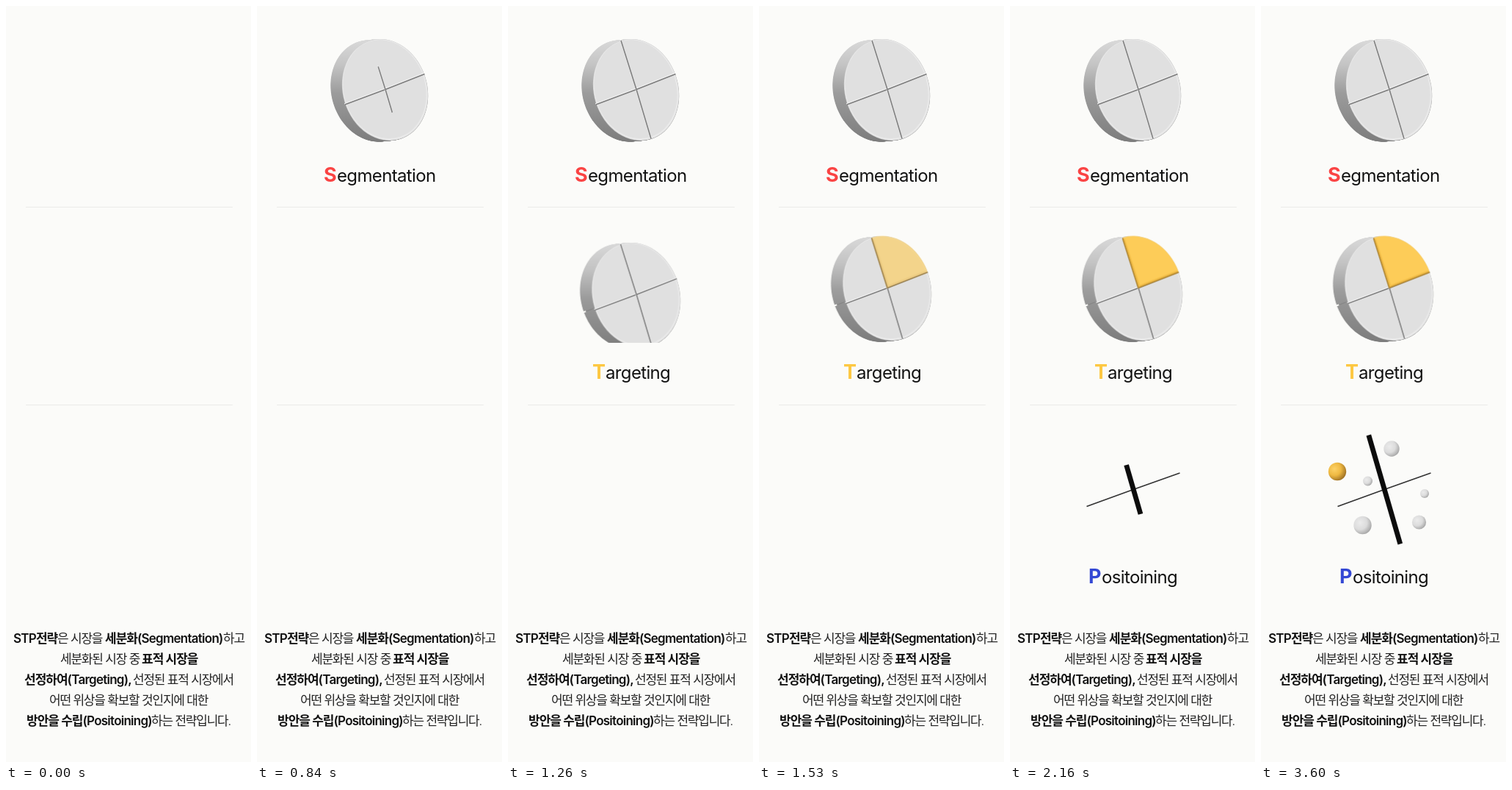
Animation of 334 by 1028 pixels, one loop 4500 ms. Source, as an HTML page:

```html
<!DOCTYPE html>
<html lang="ko">
<head>
<meta charset="utf-8">
<title>STP</title>
<style>
  html, body { margin: 0; width: 100%; height: 100%; overflow: hidden; background: #fbfbf9; }
  svg { display: block; width: 334px; height: 1028px; }
  text { font-family: Inter, "Noto Sans CJK KR", "Noto Sans CJK", sans-serif; white-space: pre; }
  .label { font-size: 24px; letter-spacing: -.65px; fill: #111; }
  .label .initial { font-size: 27px; font-weight: 700; letter-spacing: 0; }
  .copy { font-size: 17px; font-weight: 300; letter-spacing: -1.22px; fill: #222; }
  .copy.strong { font-weight: 600; letter-spacing: -1px; fill: #111; }
  .copy .latin { letter-spacing: -.75px; }
  .ball { transform-box: fill-box; transform-origin: center; }
</style>
</head>
<body>
<svg id="stage" viewBox="0 0 334 1028">
  <defs>
    <linearGradient id="side" x1="0" y1="-69" x2="0" y2="72" gradientUnits="userSpaceOnUse">
      <stop offset="0" stop-color="#dadada"/>
      <stop offset=".25" stop-color="#c4c4c4"/>
      <stop offset=".52" stop-color="#9c9c9c"/>
      <stop offset="1" stop-color="#7c7c7c"/>
    </linearGradient>
    <radialGradient id="gray" cx=".36" cy=".36" r=".7">
      <stop offset="0" stop-color="#ebebeb"/>
      <stop offset=".55" stop-color="#dcdcdc"/>
      <stop offset="1" stop-color="#a4a4a4"/>
    </radialGradient>
    <radialGradient id="gold" cx=".34" cy=".36" r=".72">
      <stop offset="0" stop-color="#fdd268"/>
      <stop offset=".5" stop-color="#efb942"/>
      <stop offset="1" stop-color="#9a6d22"/>
    </radialGradient>
    <clipPath id="window1"><rect x="90" y="40" width="155" height="145.5"/></clipPath>
    <clipPath id="window2"><rect x="90" y="308" width="155" height="149.5"/></clipPath>
  </defs>
  <path d="M27 273.5H309M27 542.5H309" stroke="#ebebe9"/>
</svg>
<script>
const LOOP = 4500;
const SMOOTH = 'cubic-bezier(.37,0,.63,1)';
const TILT = -17;
const stage = document.getElementById('stage');

function add(parent, tag, attrs = {}, text = '') {
  const el = document.createElementNS('http://www.w3.org/2000/svg', tag);
  for (const [name, value] of Object.entries(attrs)) el.setAttribute(name, value);
  el.textContent = text;
  return parent.appendChild(el);
}

// Holds `from` until start, eases to `to` by end, then holds for the rest of the loop.
function tween(el, prop, from, to, start, end, easing = SMOOTH) {
  el.animate([
    { [prop]: from, offset: 0 },
    { [prop]: from, offset: start / LOOP, easing },
    { [prop]: to, offset: end / LOOP },
    { [prop]: to, offset: 1 }
  ], { duration: LOOP, iterations: Infinity });
}

// A straight stroke that grows outward from its origin to both ends.
function growLine(parent, [ox, oy], a, b, stroke, width, start, end) {
  const reach = Math.ceil(Math.max(...[a, b].map(([x, y]) => Math.hypot(x - ox, y - oy))));
  const line = add(parent, 'path', {
    d: `M${ox} ${oy}L${a}M${ox} ${oy}L${b}`,
    fill: 'none', stroke, 'stroke-width': width, 'stroke-dasharray': `${reach} 400`
  });
  if (end) tween(line, 'strokeDashoffset', `${reach}px`, '0px', start, end);
}

function seam(parent, a, b, start, end) {
  const lit = ([x, y]) => [x - .8, y - 1];
  growLine(parent, [-.8, -1], lit(a), lit(b), '#f0f0f0', 1.4, start, end);
  growLine(parent, [0, 0], a, b, '#7c7c7c', 1.5, start, end);
}

function oval(parent, x, y, rx, ry, fill) {
  add(parent, 'ellipse', { rx, ry, fill, transform: `translate(${x} ${y}) rotate(${TILT})` });
}

function disk(y, scale, clip, rise, start, end) {
  const holder = add(stage, 'g', { 'clip-path': `url(#${clip})` });
  const mover = add(holder, 'g');
  tween(mover, 'transform', `translateY(${rise}px)`, 'translateY(0px)', start, end);
  const body = add(mover, 'g', { transform: `translate(175 ${y}) scale(${scale})` });
  // The rim is the hull of several ovals stepping back from the face.
  const rim = add(body, 'g', { fill: 'url(#side)' });
  for (let depth = 0; depth <= 1; depth += 1 / 32) {
    const points = [];
    const cx = -16 + 15.5 * depth, cy = 2 - 1.5 * depth, tilt = TILT * Math.PI / 180;
    for (let a = 0; a < 2 * Math.PI; a += Math.PI / 60) {
      const u = 57.5 * Math.cos(a), v = 70 * Math.sin(a);
      points.push([cx + u * Math.cos(tilt) - v * Math.sin(tilt), cy + u * Math.sin(tilt) + v * Math.cos(tilt)]);
    }
    add(rim, 'polygon', { points: points.join(' ') });
  }
  oval(body, -.5, .5, 57.5, 70, '#d3d3d3');
  oval(body, -.5, .3, 56.9, 69.4, '#e9e9e9');
  oval(body, -1, -.3, 55.5, 67.8, '#e0e0e0');
  return body;
}

function label(x, y, initial, rest, restX, color, start, end) {
  const text = add(stage, 'text', { class: 'label', y });
  add(text, 'tspan', { class: 'initial', x, fill: color }, initial);
  add(text, 'tspan', { x: restX }, rest);
  tween(text, 'opacity', 0, 1, start, end, 'linear');
}

function copy(x, y, words, strong) {
  const text = add(stage, 'text', { class: strong ? 'copy strong' : 'copy', x, y });
  words.split(/([!-~]+)/).filter(Boolean).forEach(part =>
    add(text, 'tspan', /[!-~]/.test(part) ? { class: 'latin' } : {}, part));
}

const LONG = [[-55, 20.5], [53.5, -21]];
const STEEP = [[-21, -66.4], [20, 67]];

// Segmentation
label(91, 239, 'S', 'egmentation', 109, '#fa4343', 30, 270);
const whole = disk(113.5, 1, 'window1', 143, 110, 610);
seam(whole, ...LONG, 590, 760);
seam(whole, ...STEEP, 750, 940);

// Targeting
label(115, 507, 'T', 'argeting', 133, '#fdc843', 870, 1080);
const target = disk(383.5, 1.03, 'window2', 149, 840, 1340);
add(target, 'path', { d: 'M-70 23.5L-57 18.5', stroke: '#858585', 'stroke-width': 1 });
add(target, 'path', { d: 'M-73 24.5L-67 22', stroke: '#fbfbf9', 'stroke-width': 2 });
seam(target, ...LONG);
seam(target, ...STEEP);
const slice = add(target, 'g');
add(slice, 'path', { d: `M0 0L-21-66.4A57.5 70 ${TILT} 0 1 53.5-21Z`, fill: '#fdcc58' });
add(slice, 'path', { d: 'M-20.5-65.5L0-.5L53-21', fill: 'none', stroke: '#bd8f32', 'stroke-width': 1.9 });
add(slice, 'path', { d: 'M-18.5-64.5L1.5-3L51.5-22.5', fill: 'none', stroke: '#f3bd45', 'stroke-width': 1.4 });
tween(slice, 'opacity', 0, 1, 1380, 1620, 'linear');

// Positioning
label(107, 785, 'P', 'ositoining', 125, '#3448d4', 1590, 1800);
growLine(stage, [168, 657.5], [104.5, 680.5], [231.5, 635], '#333', 1.7, 1920, 2160);
growLine(stage, [168.3, 657.5], [146.8, 583.5], [189.8, 731.5], '#0c0c0c', 6.8, 2040, 2300);
[
  [178, 602, 10.7], [145.5, 646, 6.5], [223, 663, 6],
  [215.5, 702, 9.6], [138.5, 706, 12.2], [104, 633, 12.2, 'gold']
].forEach(([cx, cy, r, paint = 'gray'], i) => {
  const ball = add(stage, 'circle', { class: 'ball', cx, cy, r, fill: `url(#${paint})` });
  const start = 2220 + i * 30;
  tween(ball, 'transform', 'scale(0)', 'scale(1)', start, start + 180, 'ease-out');
});

// Closing paragraph
[
  [10, 866, 'STP전략', true], [70, 866, '은 시장을'],
  [135, 866, '세분화(Segmentation)', true], [296, 866, '하고'],
  [74, 894, '세분화된 시장 중'], [185, 894, '표적 시장을', true],
  [25, 922, '선정하여(Targeting),', true], [173, 922, '선정된 표적 시장에서'],
  [59, 950, '어떤 위상을 확보할 것인지에 대한'],
  [28, 978, '방안을 수립(Positoining)', true], [198, 978, '하는 전략입니다.']
].forEach(run => copy(...run));
</script>
</body>
</html>
```
